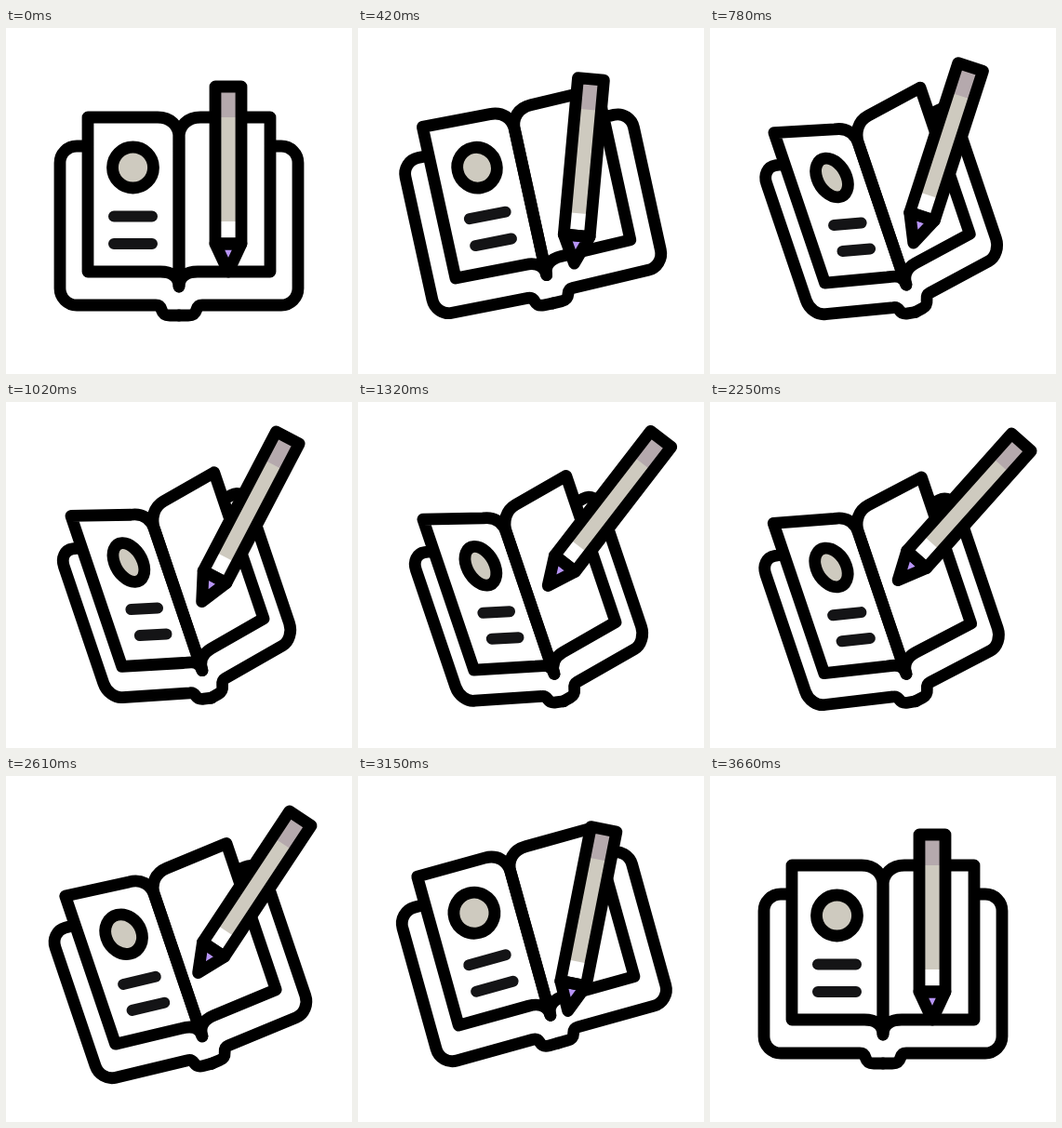
An HTML page that plays this animation: 372x372 px, repeating every 4230 ms.

```html
<!DOCTYPE html>
<html lang="en">
<head>
<meta charset="utf-8">
<title>Book and pencil</title>
<style>
  html, body { margin: 0; width: 100%; height: 100%; overflow: hidden; background: #fff; }
  svg { display: block; width: 372px; height: 372px; }
  path, circle {
    fill: none; stroke: #000; stroke-width: 12.8;
    stroke-linecap: round; stroke-linejoin: round;
    vector-effect: non-scaling-stroke;
  }
  .fill { stroke: none; }
  .line { stroke: #141416; stroke-width: 12; }
</style>
</head>
<body>
<svg viewBox="0 0 372 372">
  <g id="book">
    <g id="left">
      <path id="leftHalf"/>
      <g id="art">
        <circle r="22" cy="-50" style="fill:#cecabf"/>
        <path class="line" d="M-20.5 2.5H20.5M-20.5 32H20.5"/>
      </g>
    </g>
    <path id="right"/>
  </g>
  <!-- Pencil with its tip at the local origin -->
  <g id="pencil">
    <path class="fill" style="fill:#fff" d="M-14-199H14V-30H-14Z"/>
    <path class="fill" style="fill:#cecabf" d="M-14-199H14V-54H-14Z"/>
    <path class="fill" style="fill:#b5a9ad" d="M-14-199H14V-166H-14Z"/>
    <path style="fill:#b794f6" d="M-14-30L0 0L14-30Z"/>
    <path d="M-14-199H14V-30H-14Z"/>
  </g>
</svg>
<script>
  const LOOP = 4230, MOVE = 3660, STEP = 30;
  const $ = id => document.getElementById(id);
  const place = (id, transform) => $(id).setAttribute("transform", transform);

  function ease(t, from, to) {
    const u = Math.min(Math.max((t - from) / (to - from), 0), 1);
    return u * u * (3 - 2 * u);
  }

  // Cover and page left of the spine; bend lowers the page near the spine
  const half = bend => `
    M-98-73H-110A18 18 0 0 0-128-55V${80 - bend / 2}A18 18 0 0 0-110 ${98 - bend / 2}
    L-25 ${98 + bend / 2}C-15 ${98 + bend / 2}-23 109-10 109H0
    M0 78C0 67-9 ${62 + bend}-20 ${62 + bend}L-98 62V${-104 - bend}
    L-23 ${bend / 2 - 104}C-9 ${bend / 2 - 104} 0-95 0-82Z`;

  function draw(now) {
    const t = Math.min(Math.floor((now % LOOP) / STEP) * STEP, MOVE);
    const pulse = (a, b, c, d) => ease(t, a, b) - ease(t, c, d);

    const turn = pulse(0, 690, 2970, 3660);
    const fold = pulse(300, 900, 1950, 3100);
    const drop = pulse(240, 1200, 2290, 3150);
    const tilt = pulse(80, 1630, 2190, 3640);
    const reach = pulse(80, 1630, 2130, 3450);

    const width = 1 - .18 * fold, lift = .16 * fold, bend = 5 * fold;
    place("book", `translate(186 ${200 - 21.5 * turn + 40 * drop}) rotate(${-18.7 * turn})`);
    place("left", `matrix(${width} ${lift} 0 1 0 0)`);
    place("right", `matrix(${-width} ${lift} 0 1 0 0)`);
    place("art", `matrix(${width} ${.06 * fold} 0 1 ${3.5 * fold - 49.5} 0)`);
    $("leftHalf").setAttribute("d", half(bend));

    const tipX = 239 - 55 * tilt + 18 * tilt * tilt;
    place("pencil", `translate(${tipX} ${262 - 72 * reach}) rotate(${42 * tilt})`);
  }

  $("right").setAttribute("d", half(0));
  const start = performance.now();
  function tick() {
    draw(performance.now() - start);
    requestAnimationFrame(tick);
  }
  tick();
</script>
</body>
</html>
```
